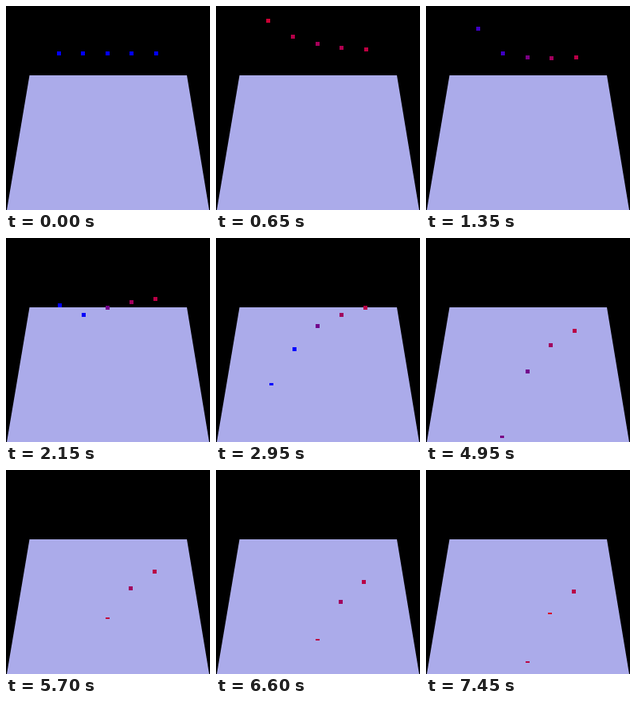
Animation, 256 px wide and 256 px high, one loop 7500 ms. Source, as an HTML page with a canvas:

```html
<!DOCTYPE html>
<html lang="en">
<head>
<meta charset="utf-8">
<title>Particles with different drag on a slope</title>
<style>
html, body { margin: 0; width: 100%; height: 100%; overflow: hidden; background: #000; }
canvas { display: block; }
</style>
</head>
<body>
<canvas id="stage" width="256" height="256"></canvas>
<script>
const ctx = document.getElementById('stage').getContext('2d');
const LOOP = 7500, STEP = 50;
const START_Y = 59.5, FLOOR_Y = 179.5, FALL = 122;
const GRAVITY = 73, LAUNCH = -78, DRAG = 1.25, LEAD = 0.27;
const CENTER_X = 127.3, BLUE_SPEED = 53, DEPTH = 690;

// Distance and speed after t seconds under gravity with linear drag k.
function travel(t, v0, k) {
  if (!k) return [v0 * t + GRAVITY * t * t / 2, v0 + GRAVITY * t];
  const end = GRAVITY / k, decay = Math.exp(-k * t);
  return [end * t + (v0 - end) * (1 - decay) / k, end + (v0 - end) * decay];
}

// Time at which a launched particle has dropped onto the slope.
function landingTime(k) {
  let lo = 0, hi = 20;
  for (let i = 0; i < 40; i++) {
    const mid = (lo + hi) / 2;
    if (travel(mid, LAUNCH, k)[0] < FALL) lo = mid; else hi = mid;
  }
  return hi;
}

const particles = [0, 1, 2, 3, 4].map(n => {
  const k = DRAG * n, land = landingTime(k);
  const impact = travel(land, LAUNCH, k)[1];
  return { lane: n / 2 - 1, k, land, slide: impact * (n ? 0.75 : 1) };
});

function drawParticle(p, t) {
  const landed = t >= p.land;
  let [dist, speed] = landed
    ? travel(t - p.land, p.slide, p.k)
    : travel(t, LAUNCH, p.k);
  let y, scale, bottom;
  if (landed) {
    if (dist > 120) return;
    y = FLOOR_Y + dist / (1 - dist / DEPTH);
    scale = 57.2 + 0.0828 * (y - FLOOR_Y);
    bottom = y;
    speed /= 2;
  } else {
    y = START_Y + dist * (FLOOR_Y - START_Y + 2 * (1 - dist / FALL)) / FALL;
    scale = 61 - 0.031 * (y - START_Y);
    bottom = Math.min(y + 2.5, FLOOR_Y + 0.5);
  }
  const red = Math.round(255 * Math.max(0, 1 - Math.abs(speed) / BLUE_SPEED));
  const top = Math.round(y - 2.5);
  ctx.fillStyle = `rgb(${red},0,${255 - red})`;
  ctx.fillRect(Math.round(CENTER_X + p.lane * scale - 2.5), top, 5, Math.round(bottom) - top);
}

function drawSlope() {
  ctx.fillStyle = '#ababea';
  ctx.beginPath();
  ctx.moveTo(29.5, 87);
  ctx.lineTo(227, 87);
  ctx.lineTo(255, 256);
  ctx.lineTo(1, 256);
  ctx.fill();
}

function frame(now) {
  const ms = Math.floor(now % LOOP / STEP) * STEP;
  ctx.fillStyle = '#000';
  ctx.fillRect(0, 0, 256, 256);
  drawSlope();
  const t = ms ? ms / 1000 + LEAD : 0;
  particles.forEach(p => drawParticle(p, t));
}

const begin = performance.now();
function tick() {
  frame(performance.now() - begin);
  requestAnimationFrame(tick);
}
tick();
</script>
</body>
</html>
```
